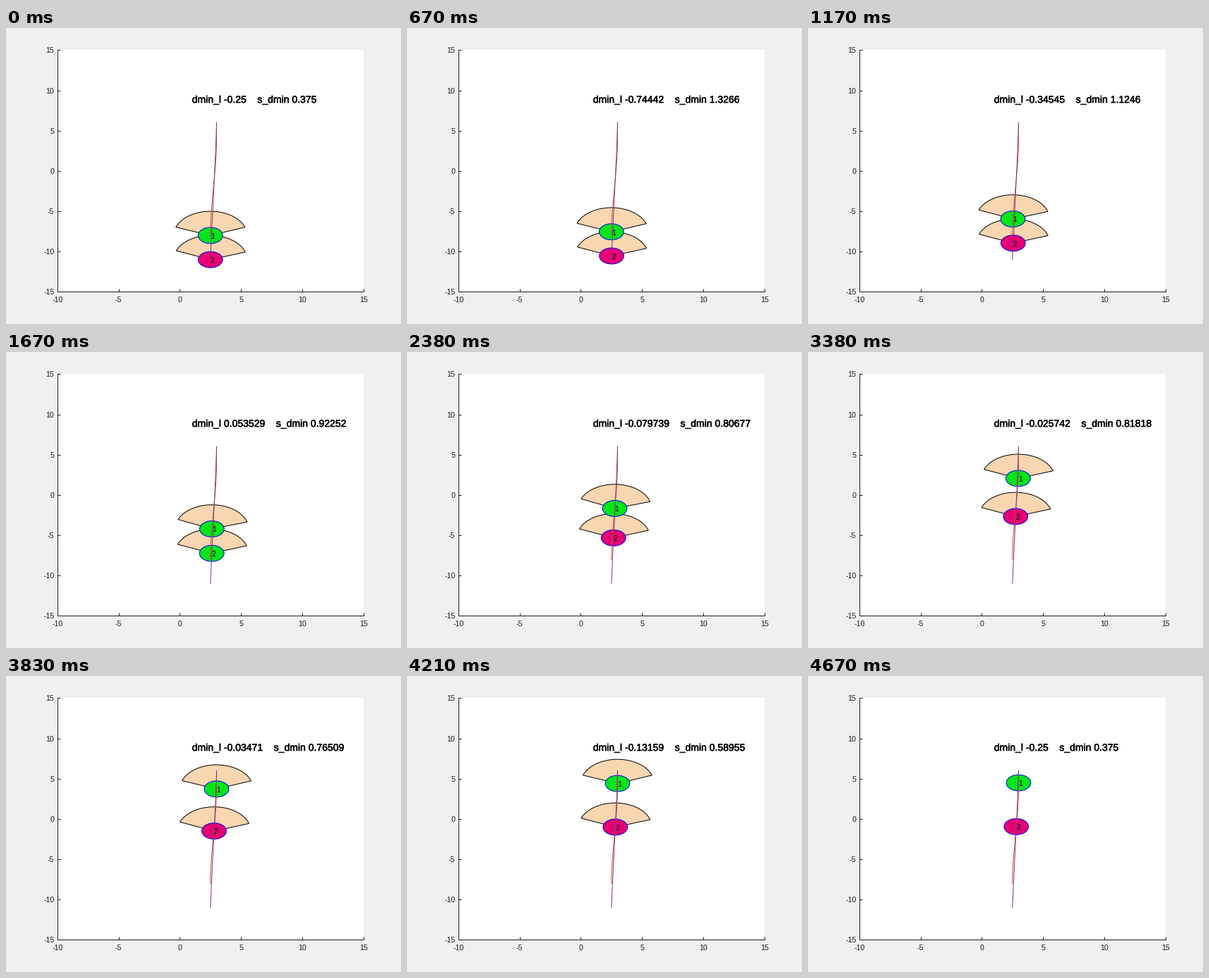
Recreate the animation shown at these times as a matplotlib script. Size 560 by 420 pixels, loop 4960 ms.

```python
import matplotlib.pyplot as plt
import numpy as np
from matplotlib.animation import FuncAnimation
from matplotlib.patches import Circle, Polygon
from matplotlib.patheffects import withStroke

plt.rcParams["font.family"] = "Liberation Sans"
plt.rcParams["axes.unicode_minus"] = False

LOOP_MS = 4960
TICK_MS = 20
FPS = 24
LAST = 112          # step at which both agents have stopped
PX = 0.72           # points per pixel at 100 dpi

PAGE, PAPER, INK = "#f0f0f0", "#ffffff", "#1c1c1c"
GREEN, RED, TAN = "#00e619", "#e60073", "#f8d6b0"

LEAD_START, TAIL_START, GOAL_Y = -8, -11, 6
VIEW_RADIUS = 3
VIEW_HALF = np.radians(70)

# Key readings: step, dmin_l, s_dmin
IDLE = (-.25, .375)
READINGS = np.array([
    (0, *IDLE), (16, -.74442, 1.3266), (40, .053529, .92252),
    (57, -.079739, .80677), (69, -.015958, .8761), (92, -.03471, .76509),
    (LAST, *IDLE)])


def sigmoid(x):
    return 1 / (1 + np.exp(-x))


def travel(speed):
    return np.concatenate([[0], np.cumsum(speed)])


def lead_x(y):
    w = np.clip((y - LEAD_START) / (0.85 * (GOAL_Y - LEAD_START)), 0, 1)
    return 2.5 + 0.5 * w * w * (3 - 2 * w)


def tail_x(y):
    u = (y - TAIL_START) / (GOAL_Y - TAIL_START)
    return 2.5 + 0.5 * (u + 0.5 * u ** 3 * (1 - u))


# The leader starts and stops softly; the follower drops back midway.
step = np.arange(LAST) + 0.5
lead_speed = ((0.135 + 0.0003 * step)
              * sigmoid((step - 13.5) / 2.5) * sigmoid((96 - step) / 3))
tail_speed = lead_speed * (1 - 0.29 * sigmoid((step - 42) / 2))

fig = plt.figure(figsize=(5.6, 4.2), dpi=100, facecolor=PAGE)
ax = fig.add_axes([0.13, 45.6 / 420, 0.775, 343 / 420], facecolor=PAPER)
ax.set(xlim=(-10, 15), ylim=(-15, 15),
       xticks=range(-10, 16, 5), yticks=range(-15, 16, 5))
ax.spines[["top", "right"]].set_visible(False)
for side in ("left", "bottom"):
    ax.spines[side].set(color=INK, linewidth=PX)
ax.tick_params(direction="in", length=4.3 * PX, width=PX, color=INK,
               labelcolor=INK, labelsize=10.6 * PX)
ax.tick_params(axis="x", pad=6.5 * PX)
ax.tick_params(axis="y", pad=4.5 * PX)


class Agent:
    def __init__(self, name, path_x, ys, color):
        self.path_x, self.ys = path_x, ys
        self.view = ax.add_patch(Polygon([(0, 0)], fc=TAN, ec="black",
                                         lw=PX, zorder=2))
        self.body = ax.add_patch(Circle((0, 0), 1, ec="#0000f0",
                                        lw=PX, zorder=3))
        self.label = ax.text(0, 0, name, size=10.6 * PX, zorder=5)
        track = np.linspace(ys[0], GOAL_Y, 120)
        ax.plot(path_x(track), track, color=color, lw=PX, zorder=4)

    def place(self, k, fill):
        y = self.ys[k]
        x = self.path_x(y)
        slope = (self.path_x(y + .01) - self.path_x(y - .01)) / .02
        heading = np.pi / 2 - np.arctan(slope)
        arc = heading + np.linspace(-VIEW_HALF, VIEW_HALF, 50)
        rim = np.column_stack([x + VIEW_RADIUS * np.cos(arc),
                               y + VIEW_RADIUS * np.sin(arc)])
        self.view.set_xy(np.vstack([[x, y], rim]))
        self.view.set_visible(k < LAST)
        self.body.center = x, y
        self.body.set_facecolor(fill)
        self.label.set_position((x, y - .38))


lead = Agent("1", lead_x, LEAD_START + travel(lead_speed), "#d95319")
tail = Agent("2", tail_x, TAIL_START + travel(tail_speed), "#7e2f8e")
readout = ax.text(1, 8.47, "", size=14 * PX, zorder=6,
                  path_effects=[withStroke(linewidth=0.4, foreground="black")])


def draw(n):
    t = (n + 0.5) * TICK_MS
    k = min(int((t + 5) * FPS / 1000), LAST)
    steps, dmins, s_dmins = READINGS.T
    dmin = np.interp(k, steps, dmins)
    s_dmin = np.interp(k, steps, s_dmins)
    lead.place(k, GREEN)
    tail.place(k, RED if dmin < 0 else GREEN)
    readout.set_text(f"dmin_l {dmin:.5g}    s_dmin {s_dmin:.5g}")
    return []


anim = FuncAnimation(fig, draw, frames=LOOP_MS // TICK_MS, interval=TICK_MS,
                     repeat=True, repeat_delay=0)
plt.show()
```
